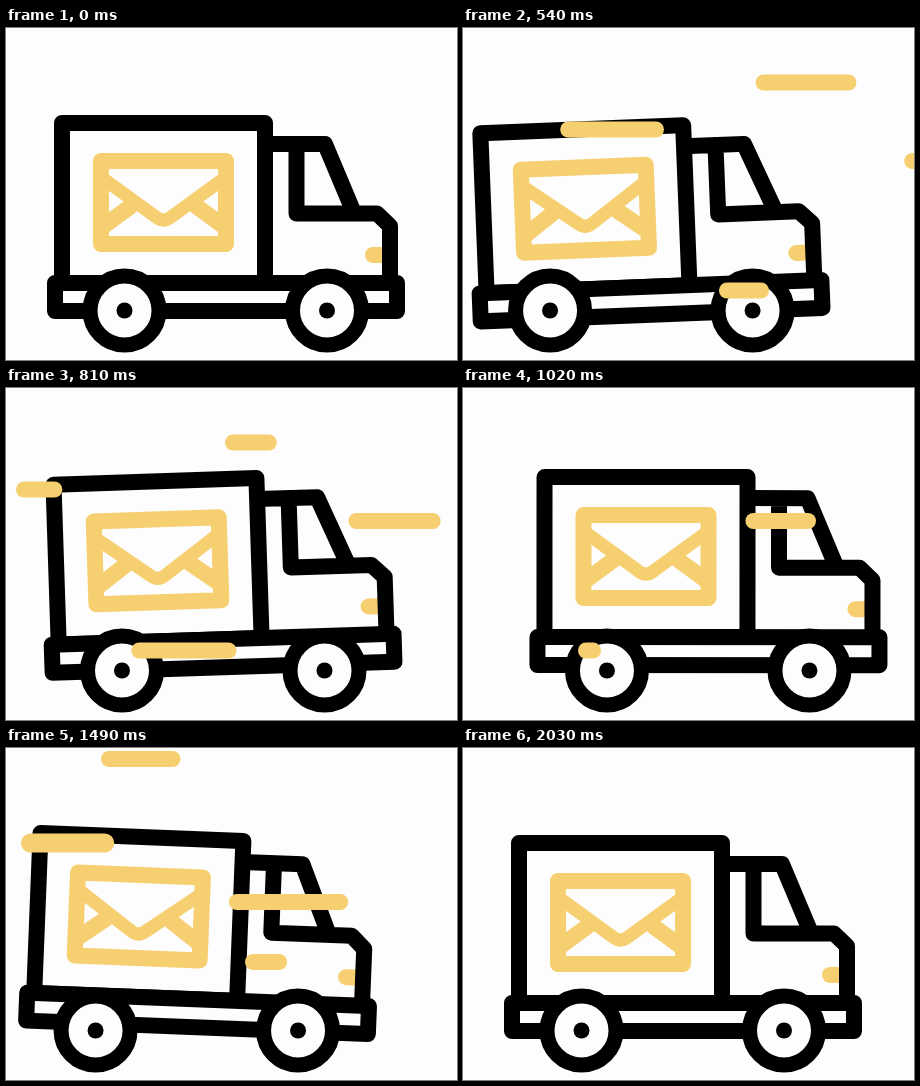
An HTML page for the animation above (2090 ms loop, 451x332 px).

```html
<!DOCTYPE html>
<html>
<head>
<meta charset="utf-8">
<style>
html, body { margin: 0; width: 100%; height: 100%; overflow: hidden; background: #fdfdfd; }
svg { display: block; }
.ink { fill: #fdfdfd; stroke: #000; stroke-width: 16; }
.gold { fill: none; stroke: #f6cf70; stroke-width: 16; }
</style>
</head>
<body>
<svg width="451" height="332" viewBox="0 0 451 332" stroke-linecap="round" stroke-linejoin="round">
  <g id="body">
    <path fill="#fdfdfd" d="M259 116H319L348 185H371L384 198V255H259Z"/>
    <path class="gold" d="M367 227H384"/>
    <path class="ink" style="fill:none" d="M259 116H319L348 185M290.5 116V185.5H371L384 198V255"/>
    <rect class="ink" x="56" y="95" width="203" height="160"/>
    <rect class="ink" x="49" y="255" width="342" height="28"/>
    <path class="gold" d="M95 133H220V216H95ZM95 200L125 178M220 200L190 178"/>
    <path class="gold" style="stroke-width:13" d="M95 149L150 189Q157.5 195 165 189L220 149"/>
  </g>
  <g id="wheels">
    <g id="wheel">
      <circle class="ink" cx="118.5" cy="282.5" r="34.5" style="stroke-width:15"/>
      <circle cx="118.5" cy="282.5" r="8"/>
    </g>
    <use href="#wheel" x="202.5"/>
  </g>
  <g id="wind" class="gold"></g>
</svg>
<script>
const LOOP = 2090, STEP = 67.8, REST = 2030;
const REACH = 175, LAG = 190;   // how far a streak flies, how long its tail waits
const $ = id => document.getElementById(id);

// Turning points as [time, value]
const shift = [[0, 0], [560, -31.5], [1070, 27], [1440, -29.5], [REST, 0]];
const bounce = [[0, 0], [340, 6.3], [1000, -6], [1290, 6], [1500, -3.7], [REST, 0]];

const streaks = [
  { y: 54.5, x: 402, start: 245, time: 540 },
  { y: 101.5, x: 193, start: 362, time: 360 },
  { y: 262.5, x: 298, start: 400, time: 490 },
  { y: 133, x: 461, start: 434, time: 649 },
  { y: 11, x: 278, start: 1025, time: 470 },
  { y: 95, x: 195, start: 1025, time: 520, width: 19 },
  { y: 214, x: 422, start: 1025, time: 370 },
  { y: 154, x: 337, start: 1270, time: 390 }
];

function ease(p) {
  return (1 - Math.cos(Math.PI * Math.min(1, Math.max(0, p)))) / 2;
}

function track(keys, t) {
  let i = 1;
  while (i < keys.length - 1 && t > keys[i][0]) i++;
  const [a, from] = keys[i - 1], [b, to] = keys[i];
  return from + (to - from) * ease((t - a) / (b - a));
}

// One slow sway that lingers at both extremes
function tilt(t) {
  const turn = 2 * Math.PI * Math.min(1, t / REST);
  return -2.4 * Math.sin(turn - 0.45 * Math.sin(turn));
}

for (const s of streaks) {
  s.line = document.createElementNS('http://www.w3.org/2000/svg', 'path');
  s.line.style.strokeWidth = s.width || 16;
  $('wind').append(s.line);
}

function drawStreak({ y, x, start, time, line }, t) {
  const age = t - start;
  const at = ms => x - REACH * ease(ms / time);
  const alive = age > 0 && age < time + LAG;
  line.setAttribute('d', alive ? `M${at(age - LAG)} ${y}H${at(age)}` : '');
}

function draw(now) {
  const t = Math.floor((now % LOOP + 4) / STEP) * STEP;
  const x = track(shift, t);
  $('wheels').setAttribute('transform', `translate(${x})`);
  $('body').setAttribute('transform',
    `translate(${x} ${track(bounce, t)}) rotate(${tilt(t)} 220 282)`);
  for (const s of streaks) drawStreak(s, t);
}

const begin = performance.now();
function tick() {
  draw(performance.now() - begin);
  requestAnimationFrame(tick);
}
tick();
</script>
</body>
</html>
```
